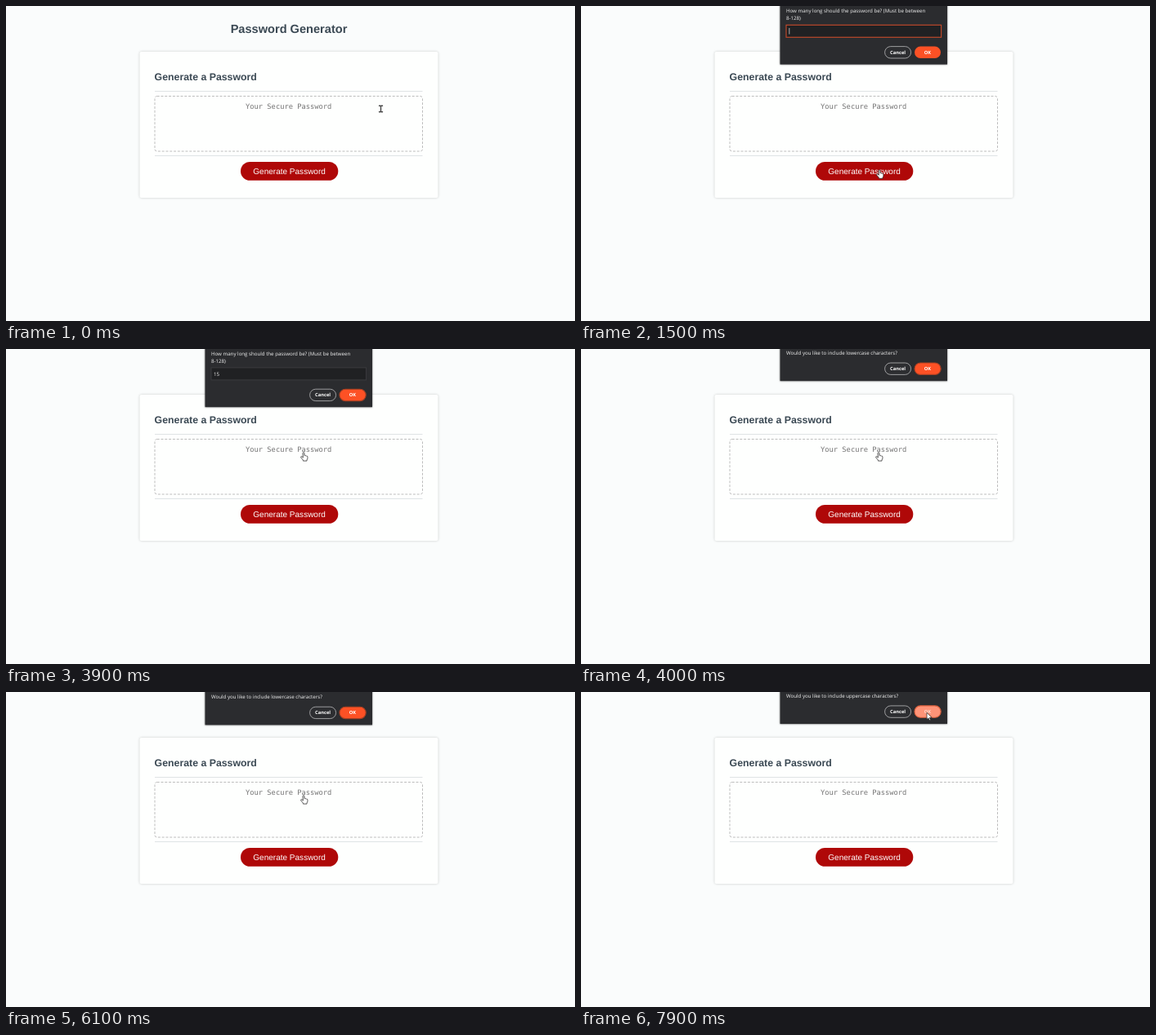
An HTML page for the animation above (8 s loop, 696x386 px).

```html
<!DOCTYPE html>
<html lang="en">
<head>
<meta charset="utf-8">
<title>Password Generator</title>
<style>
  html, body { margin: 0; width: 100%; height: 100%; overflow: hidden; background: #fafcfc; }
  svg { display: block; width: 696px; height: 386px; }
  text { text-rendering: geometricPrecision; white-space: pre; }
  .page { font-family: "Liberation Sans", Arial, sans-serif; fill: #3b4954; }
  .bold { font-weight: 700; }
  .mono { font-family: "DejaVu Sans Mono", monospace; font-size: 8.75px; fill: #757575; }
  .card { fill: #fefffe; filter: drop-shadow(0 .9px 1.8px rgba(0, 0, 0, .2)); }
  .rule { stroke: #dfe3e5; stroke-width: 1; }
  .box { fill: none; stroke: #bdbdbd; stroke-width: 1; stroke-dasharray: 3 1.8; }
  .panel { fill: #2b2c2f; filter: drop-shadow(0 .6px 1.2px rgba(0, 0, 0, .55)); }
  .dialog text { font-family: "Open Sans", "Noto Sans", sans-serif; font-size: 6.15px; fill: #f2f2f2; }
  .dialog .label { font-size: 5.75px; font-weight: 700; fill: #fff; text-anchor: middle; }
  .cancel { fill: #2d2e31; stroke: #b9b9ba; stroke-width: .8; }
  .ok { fill: #fd5125; }
  .ring { fill: none; stroke: #a94023; stroke-width: 1.1; }
  .hot .ok { fill: #ff9478; }
  .hot .ring { stroke: #e0633f; }
  .hot .okLabel { fill: #ffd9ce; }
  .field { fill: #202123; stroke: #3c3d40; stroke-width: .9; }
  .focus .field { stroke: #c74b2b; stroke-width: 1.1; }
  .focus .ring { display: none; }
  .caret { stroke: #eee; stroke-width: .7; }
  .cursor { stroke-linejoin: round; stroke-linecap: round; }
</style>
</head>
<body>
<svg viewBox="0 0 696 386">
  <g class="page">
    <text class="bold" x="346" y="33" font-size="14.6" text-anchor="middle">Password Generator</text>
    <rect class="card" x="163.5" y="56" width="365" height="179" rx="2.3"/>
    <text class="bold" x="181.6" y="90.6" font-size="12.32">Generate a Password</text>
    <path class="rule" d="M182 104.5H509.5M182 183.5H509.5"/>
    <rect class="box" x="182" y="110.5" width="327.5" height="67.5" rx="2.7"/>
    <text class="mono" x="345.7" y="126" text-anchor="middle">Your Secure Password</text>
    <rect x="287" y="191" width="119.3" height="22.8" rx="11.4" fill="#af0808"/>
    <text x="346.6" y="206" font-size="10.03" text-anchor="middle" style="fill:#fff">Generate Password</text>
  </g>

  <g class="dialog" id="dialog">
    <rect class="panel" id="panel" x="243.5" y="-20" width="204.5"/>
    <text id="line1" x="251" y="8.2"></text>
    <g id="prompt">
      <text x="251" y="17.2">8-128)</text>
      <rect class="field" x="251" y="23.3" width="189.6" height="15"/>
      <text id="typed" x="254" y="33"></text>
      <path class="caret" id="caret" d="M0 27V34.6"/>
    </g>
    <g id="buttons">
      <rect class="cancel" x="371.6" y="0" width="32" height="14.4" rx="7.2"/>
      <text class="label" x="387.6" y="9.3">Cancel</text>
      <rect class="ok" x="408" y="0" width="32" height="14.4" rx="7.2"/>
      <rect class="ring" x="408" y="0" width="32.2" height="14.4" rx="7.2"/>
      <text class="label okLabel" x="424" y="9.3">OK</text>
    </g>
  </g>

  <g id="cursors">
    <path class="cursor" id="beam" d="M-2 -3.7H-.6L0 -3.2L.6 -3.7H2M0 -3.2V3.2M-2 3.7H-.6L0 3.2L.6 3.7H2"
      fill="none" stroke="#444" stroke-width="1.4"/>
    <path class="cursor" id="hand" d="M-.9 .8Q0 -.5 .9 .8V4Q1.8 3.4 2.3 4.3Q3.2 3.9 3.6 4.8Q4.8 4.5 4.9 5.7V7.4Q4.9 8.7 4 9.5V10.7H-.6V9.7L-3.4 6.4Q-3.4 5 -2.2 5.3L-.9 6.4Z"
      fill="#fff" stroke="#333" stroke-width=".8"/>
    <path class="cursor" id="arrow" d="M0 0V8L1.9 6.3L3.1 9.2L4.5 8.6L3.3 5.8H5.8Z"
      fill="#fff" stroke="#222" stroke-width=".7"/>
  </g>
</svg>
<script>
const LOOP = 8000;
const $ = id => document.getElementById(id);

const ASK = {
  length: "How many long should the password be? (Must be between",
  lower: "Would you like to include lowercase characters?",
  upper: "Would you like to include uppercase characters?"
};

// [time, shape, x, y]
const pointer = [
  [0, "beam", 458.5, 126],
  [400, "beam", 452, 130],
  [500, "beam", 430, 143],
  [600, "beam", 400, 161],
  [700, "arrow", 374, 181],
  [800, "hand", 358, 196],
  [900, "hand", 365.5, 200],
  [1100, "hand", 365, 200.6],
  [1800, "hand", 365, 194],
  [1900, "hand", 365, 178],
  [2000, "hand", 364.6, 160],
  [2100, "hand", 364.3, 143],
  [2200, "hand", 364, 130],
  [2300, "hand", 364, 126.4],
  [6400, "hand", 367, 121],
  [6500, "hand", 377, 104],
  [6600, "hand", 392, 80],
  [6700, "hand", 408, 54],
  [6800, "arrow", 419, 35],
  [6900, "arrow", 423, 28],
  [7000, "arrow", 423, 25.6]
];

// [time, question, vertical shift, opacity, has focus in field]
const dialogs = [
  [0, null],
  [1400, "length", -1.2, .85, true],
  [1500, "length", 0, 1, true],
  [3900, "length", -.4, 1, false],
  [4000, "lower", -1.2, 1, false],
  [4100, "lower", 0, 1, false],
  [7700, "lower", -.4, 1, false],
  [7800, "lower", -1, .9, false],
  [7900, "upper", -1.3, 1, false]
];

// [time, typed text, caret shown]
const typing = [
  [0, "", true],
  [2300, "", false],
  [2800, "", true],
  [3300, "1", true],
  [3600, "15", true],
  [3900, "15", false]
];

const at = (steps, t) => steps.findLast(s => s[0] <= t);
const show = (el, on) => { el.style.display = on ? "" : "none"; };

function drawDialog(t) {
  const [, ask, shift, opacity, focus] = at(dialogs, t);
  const box = $("dialog");
  show(box, ask);
  if (!ask) return;
  const prompt = ask === "length";
  const [, text, caret] = at(typing, t);
  box.setAttribute("transform", `translate(0 ${shift})`);
  box.setAttribute("opacity", opacity);
  box.classList.toggle("focus", focus);
  box.classList.toggle("hot", t >= 6900);
  $("panel").setAttribute("height", prompt ? 91.6 : 60.4);
  $("line1").textContent = ASK[ask];
  $("buttons").setAttribute("transform", `translate(0 ${prompt ? 49.6 : 18.2})`);
  show($("prompt"), prompt);
  $("typed").textContent = text;
  $("caret").setAttribute("transform", `translate(${254.8 + text.length * 3.52} 0)`);
  show($("caret"), caret);
}

function drawPointer(t) {
  const [, shape, x, y] = at(pointer, t);
  for (const id of ["beam", "hand", "arrow"]) show($(id), id === shape);
  $("cursors").setAttribute("transform", `translate(${x} ${y})`);
}

const start = performance.now();
function frame(now) {
  const t = Math.max(0, now - start) % LOOP;
  drawDialog(t);
  drawPointer(t);
  requestAnimationFrame(frame);
}
frame(start);
</script>
</body>
</html>
```
